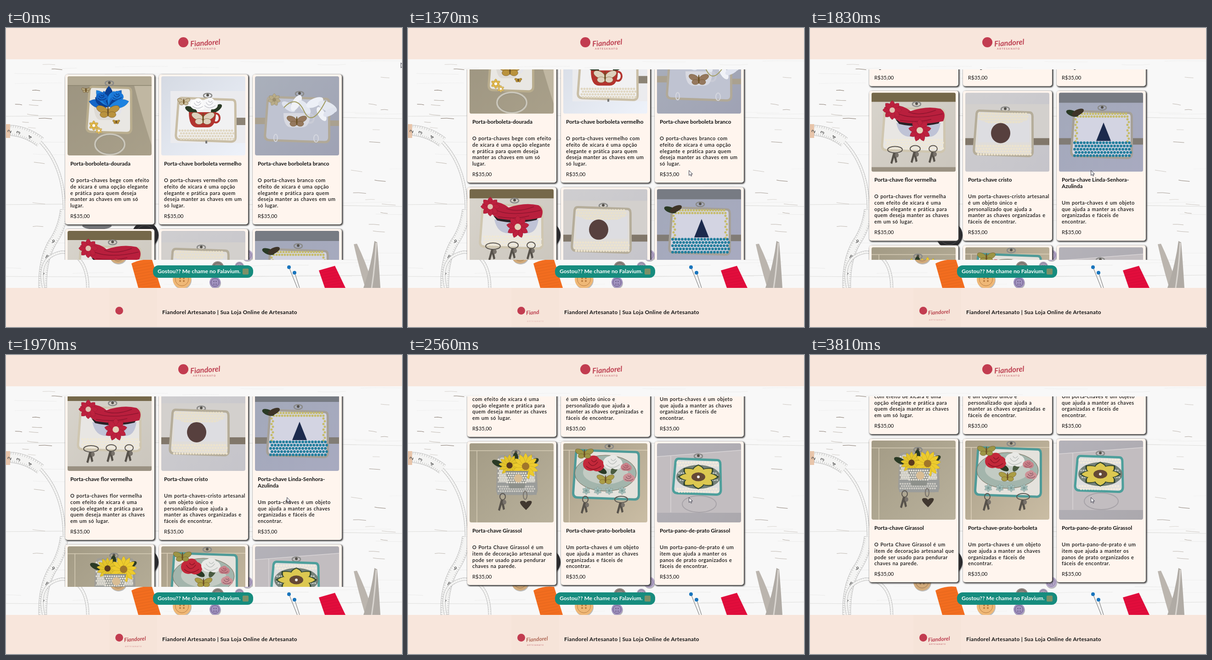
Animation, 862 px wide and 650 px high, one loop 3.88 s. Source, as an HTML page:

```html
<!DOCTYPE html>
<html lang="pt-BR">
<head>
<meta charset="utf-8">
<title>Loja de artesanato</title>
<style>
html, body { margin: 0; width: 100%; height: 100%; overflow: hidden; }
body { position: relative; font: 600 11px/13.85px Lato, Inter, sans-serif; color: #111; background: #f8f8f8; }
#stage { position: absolute; left: 0; top: 0; width: 862px; height: 650px; overflow: hidden; }
#stage > * { position: absolute; white-space: nowrap; }
.bar { left: 0; width: 862px; background: #f8e6dc; }
#view { left: 120px; top: 90px; width: 622px; height: 414px; overflow: hidden; }
#list { position: absolute; left: 0; top: 0; animation: scroll 3.88s linear infinite; }
.card { position: absolute; width: 194px; background: #fff5ee; border-radius: 5px; box-shadow: 1.5px 1.5px 3px 1px #3a3a3a; box-sizing: border-box; padding: 4px 5px; }
.card svg { display: block; width: 183px; height: 172px; border-radius: 4px; }
.card p { margin: 0 6px; }
.card .name { margin-top: 11px; font-weight: 700; font-size: 11.75px; }
.card .text { margin-top: 22px; letter-spacing: .45px; word-spacing: .7px; }
.card .price { margin-top: 9px; font-weight: 400; font-size: 11.3px; }
#chat { left: 320px; top: 516px; width: 218px; height: 27px; border-radius: 12px; background: #168c7e; color: #fff; font-size: 12.2px; font-weight: 700; line-height: 26px; text-indent: 10px; }
#chat i { position: absolute; left: 195px; top: 7px; width: 13px; height: 13px; border-radius: 2px; background: #7d9068; }
.dot { border-radius: 50%; background: #c23c50; }
.brand { color: #bd3f50; font-style: italic; font-weight: 700; transform: rotate(-4deg); }
.sub { color: #c2606a; letter-spacing: .26em; font-weight: 600; }
#wipe { animation: wipe 3.88s linear infinite; }
#rise { animation: rise 3.88s linear infinite; }
#cursor { left: 0; top: 0; animation: move 3.88s linear infinite; }
@keyframes scroll {
  0%, 29.9% { transform: translateY(0); }
  40.21% { transform: translateY(-172px); }
  47.16% { transform: translateY(-300px); }
  53% { transform: translateY(-398px); }
  56%, 58.76% { transform: translateY(-415px); }
  65.98% { transform: translateY(-585px); }
  68.6%, 100% { transform: translateY(-591px); }
}
@keyframes move {
  0% { transform: translate(859px, 75px); }
  14.43% { transform: translate(817px, 132px); }
  28.1%, 29.9% { transform: translate(612px, 305px); }
  33%, 100% { transform: translate(611px, 309px); }
}
@keyframes wipe {
  0%, 15.5% { clip-path: inset(-4px 100% -4px 0); }
  29.9% { clip-path: inset(-4px 56% -4px 0); color: #bd3f50; }
  40.21% { clip-path: inset(-4px 24% -4px 0); }
  46.5%, 100% { clip-path: inset(-4px -4px -4px 0); }
  58.76% { color: #b8494c; }
  66%, 72% { color: #b06a58; }
  90%, 100% { color: #bd3f50; }
}
@keyframes rise {
  0%, 26% { transform: translateY(12px); opacity: 0; }
  29.9% { transform: translateY(11px); opacity: .25; }
  40.21% { transform: translateY(8px); opacity: .42; }
  47.16% { transform: translateY(6px); opacity: .52; }
  58.76% { transform: translateY(4px); opacity: .7; }
  65.98% { transform: translateY(2px); opacity: .85; }
  85%, 100% { transform: translateY(0); opacity: 1; }
}
</style>
</head>
<body>
<div id="stage">
  <svg id="desk" width="862" height="565" style="left:0;top:0"></svg>
  <div id="view"><div id="list"></div></div>
  <div id="chat">Gostou?? Me chame no Falavium.<i></i></div>

  <div class="bar" style="top:0;height:68px"></div>
  <div class="dot" style="left:375px;top:20px;width:22px;height:22px"></div>
  <div class="brand" style="left:401px;top:22px;font-size:16.5px;line-height:20px">Fiandorel</div>
  <div class="sub" style="left:407px;top:41px;font-size:5.6px;line-height:8px">ARTESANATO</div>

  <div class="bar" style="top:565px;height:85px"></div>
  <div style="left:225px;top:565px;width:104px;height:85px;background:#f6e4d9"></div>
  <div class="dot" style="left:238px;top:606px;width:17px;height:17px"></div>
  <div class="brand" id="wipe" style="left:257px;top:610px;font-size:12px;line-height:15px">Fiandorel</div>
  <div class="sub" id="rise" style="left:259px;top:626px;font-size:4.1px;line-height:6px">ARTESANATO</div>
  <div style="left:340px;top:611px;font-size:11.8px;font-weight:700;letter-spacing:.34px">Fiandorel Artesanato | Sua Loja Online de Artesanato</div>

  <svg id="cursor" width="12" height="16"><path d="M.7.7V11.5L3.2 9.3 5 13 6.8 12.2 5.1 8.6H8.4Z" fill="#fff" stroke="#223" stroke-width=".9"/></svg>
</div>
<script>
let seed = 7;
const rnd = (a, b) => a + (b - a) * ((seed = seed * 16807 % 2147483647) / 2147483647);
const range = (n, f) => Array.from({ length: n }, (_, i) => f(i)).join('');

// Drawing helpers
const path = (d, fill, more = '') => `<path d="${d}" fill="${fill}" ${more}/>`;
const line = (d, color, w = 1, more = '') => path(d, 'none', `stroke="${color}" stroke-width="${w}" ${more}`);
const rect = (x, y, w, h, fill, more = '') => `<rect x="${x}" y="${y}" width="${w}" height="${h}" fill="${fill}" ${more}/>`;
const oval = (x, y, rx, ry, fill, more = '') => `<ellipse cx="${x}" cy="${y}" rx="${rx}" ry="${ry}" fill="${fill}" ${more}/>`;
const ring = (x, y, rx, ry, color, w = 2) => oval(x, y, rx, ry, 'none', `stroke="${color}" stroke-width="${w}"`);
const turned = (x, y, deg) => `transform="rotate(${deg} ${x} ${y})"`;
const fade = (id, a, b) => `<linearGradient id="${id}" x2="1" y2="1"><stop stop-color="${a}"/><stop offset="1" stop-color="${b}"/></linearGradient>` + rect(0, 0, 183, 172, `url(#${id})`);
const beads = (x, y, w, rows, color, size = 5) => range(rows, i =>
  line(`M${x + i % 2 * 3} ${y + i * (size + 1)}h${w}`, color, size, `stroke-linecap="round" stroke-dasharray="0 ${size + 1}"`));
const frame = (x, y, w, h, fill, edge, turn = 0) => `<g ${turned(x + w / 2, y + h / 2, turn)}>` +
  path(`M${x + 10} ${y}H${x + w - 10}Q${x + w - 3} ${y} ${x + w - 3} ${y + 10}L${x + w} ${y + h - 10}Q${x + w} ${y + h} ${x + w - 10} ${y + h}H${x + 10}Q${x} ${y + h} ${x} ${y + h - 10}L${x + 3} ${y + 10}Q${x + 3} ${y} ${x + 10} ${y}z`,
    fill, `stroke="${edge}" stroke-width="5"`) + '</g>';
const petal = (x, y, r, w, deg, color) => path(`M${x} ${y}q${-w} ${-r * .6} 0 ${-r}q${w} ${r * .4} 0 ${r}`, color, `${turned(x, y, deg)} stroke="#0003" stroke-width=".6"`);
const fan = (x, y, r, n, spread, colors) => range(n, i => petal(x, y, r * (i % 2 ? .8 : 1), r * .4, (i / (n - 1) - .5) * spread, colors[i % colors.length]));
const flower = (x, y, r, n, color, core) => range(n, i => petal(x, y, r, r * Math.min(.6, 4.5 / n), i * 360 / n, color)) + oval(x, y, r * .28, r * .28, core);
const rose = (x, y, r, color, shade) => oval(x - r * .3, y, r * .7, r * .65, color) + oval(x + r * .35, y + r * .1, r * .65, r * .6, color) + oval(x, y - r * .2, r * .6, r * .6, color) +
  line(`M${x - r * .5} ${y - r * .2}q${r * .4} ${r * .7} ${r * .9} 0M${x - r * .2} ${y - r * .4}q${r * .2} ${r * .4} ${r * .5} 0M${x - r * .7} ${y + r * .2}q${r * .6} ${r * .6} ${r * 1.4} 0`, shade, 1.5);
const butterfly = (x, y, s, color) => [-1, 1].map(k =>
  oval(x + k * s * .5, y - s * .15, s * .45, s * .25, color, `${turned(x + k * s * .5, y, k * -25)} stroke="#6b4f2299"`) +
  oval(x + k * s * .3, y + s * .25, s * .3, s * .22, color, 'stroke="#6b4f2299"')).join('') + oval(x, y, 1.5, s * .4, '#6b4f22');
const cup = (x, y, w, h, color, handle = color) => ring(x + w, y + h * .38, 8, h * .3, handle, 4) +
  path(`M${x} ${y}h${w}q0 ${h}-${w * .3} ${h}h${-w * .4}q${-w * .3} 0-${w * .3} ${-h}`, color);
const hook = (x, y) => ring(x, y, 9, 5, '#8a8a88', 2.5) + oval(x, y - 1, 3, 3, '#55524c');
const key = (x, y, rx = 6) => ring(x, y, rx, 7, '#5c5751', 2) + path(`M${x - 4} ${y + 7}h5l4 20-4 2-3-12-4 14-4-2z`, '#57524b') + oval(x + 4, y + 12, 4, 5, '#77716a');
const leaf = (x, y, turn, color = '#2a3a25', r = 14) => oval(x, y, r, r * .45, color, turned(x, y, turn));

const photos = [
  fade('a', '#9c9480', '#a9a08a') + rect(0, 0, 183, 19, '#b3aa94') + path('M145 20H183V150Q160 80 145 20', '#c0b7a2') + line('M0 20H183', '#8f8873', 1.5) + hook(91, 15) +
  frame(43, 24, 97, 98, '#e9e7e3', '#b9ad8e', 2) + butterfly(40, 30, 11, '#b3a57e') + cup(57, 57, 51, 38, '#dedad4', '#e4e4ea') +
  fan(90, 66, 45, 9, 150, ['#1466c8', '#0a3f94', '#1d82e0']) + rose(75, 45, 13, '#1466c8', '#0a3a88') + rose(108, 43, 14, '#1b78d8', '#0b4390') +
  butterfly(88, 76, 29, '#b9923d') + flower(57, 107, 11, 6, '#deb548', '#fff') + flower(68, 118, 8, 6, '#e1be62', '#fff') +
  butterfly(106, 99, 9, '#c49a35') + ring(92, 148, 32, 22, '#cac6ba', 4) + ring(92, 148, 30, 20, '#8d8979', 1),

  fade('b', '#d5dae3', '#eef2fa') + rect(20, 32, 163, 113, '#ebebee') + rect(160, 90, 23, 16, '#8c8375') + hook(101, 42) +
  frame(33, 49, 130, 91, '#f1f1f2', '#c9bea6', 2) + beads(40, 118, 116, 4, '#e0d7c2') + butterfly(49, 55, 16, '#cbbd9b') +
  leaf(65, 73, 25) + leaf(120, 70, -35) + rose(80, 61, 17, '#fbfbfb', '#c9c9cf') + rose(106, 60, 17, '#f8f8f9', '#c9c9cf') +
  cup(60, 78, 59, 33, '#b3342f') + butterfly(91, 91, 29, '#ded1bd') + line('M98 140v6', '#777', 4),

  fade('c', '#aab0bb', '#9fa2b4') + rect(0, 90, 30, 14, '#aaa18f') + rect(160, 96, 23, 12, '#aaa18f') + hook(97, 38) +
  frame(23, 47, 140, 94, '#bfc3d1', '#b1a998', 2) + flower(42, 51, 14, 7, '#b9ac88', '#9a8d6c') +
  cup(62, 80, 58, 31, '#d8d9e1', '#c9cbd6') +
  leaf(73, 66, 35, '#dfe3ee', 17) + leaf(90, 58, -60, '#f0f2f7', 19) + leaf(108, 67, 50, '#e4e8f0', 18) + leaf(130, 57, -25, '#edf0f7', 20) +
  leaf(158, 66, 25, '#e4e8f0', 22) + leaf(145, 82, 60, '#f0f2f7', 17) + leaf(163, 78, -30, '#dfe3ee', 16) + line('M63 68Q90 39 107 76T154 53', '#a19c61', 2) +
  butterfly(91, 97, 25, '#95785e') + ring(45, 134, 4, 8, '#d5d7df') + ring(133, 135, 5, 8, '#d5d7df'),

  fade('d', '#d8d4cc', '#cbc6bd') + rect(0, 0, 183, 20, '#75684a') + rect(0, 162, 183, 10, '#9a9182') + hook(98, 25) +
  frame(24, 35, 136, 92, '#e8e6e3', '#cfc6b0', 2) + beads(32, 103, 122, 4, '#efe8d6') +
  path('M54 66H150Q146 96 125 96H85Q60 96 54 66', '#bfc3d6') + path('M52 58Q100 74 152 56L146 67Q100 78 60 68z', '#292126') +
  path('M27 32Q60 20 85 40 120 28 150 35 164 44 156 62 110 72 62 64 40 50 27 32', '#b91f3d') +
  line('M50 42Q85 62 155 46M80 42Q105 52 140 38M62 60Q100 66 130 58', '#8f152f', 1.5) +
  flower(45, 38, 21, 8, '#bd213e', '#e0c0b0') + flower(105, 82, 25, 9, '#bd213e', '#e3d2b9') + key(51, 124, 16) + key(95, 122, 11) + key(134, 122, 9),

  fade('e', '#cfced0', '#c5c4ca') + rect(0, 25, 183, 78, '#d3d0cd') + rect(0, 99, 183, 15, '#81776a') + hook(87, 36) +
  frame(20, 41, 128, 95, '#e0ddd9', '#b5ad9a', 2) + beads(30, 46, 108, 4, '#e9e1cb') + beads(25, 116, 120, 4, '#ece3ce') +
  path('M28 58L52 67H116L140 58V108H28z', '#dddde1') + oval(77, 88, 21, 22, '#57403e'),

  fade('f', '#a3a9ba', '#a8aac0') + rect(0, 0, 183, 22, '#777b83') + rect(0, 99, 183, 14, '#817c75') + hook(94, 33) +
  frame(28, 42, 132, 98, '#d3d4e2', '#a5a097', 2) + beads(38, 46, 114, 2, '#c6bc6b') + beads(36, 58, 5, 9, '#c6bc6b') + beads(149, 58, 4, 9, '#c6bc6b') +
  beads(34, 109, 120, 5, '#237e9d', 6) + leaf(29, 45, 20) + leaf(41, 43, -25, '#3e3428') + path('M97 65l16 40h-32z', '#1c2a4d'),

  fade('g', '#a39b85', '#b9b19c') + line('M0 16H183M16 16V172', '#d5cbb5', 1.5) + hook(101, 20) + frame(60, 28, 86, 82, '#c8c7c0', '#9f9d97') +
  beads(63, 35, 80, 12, '#e1ded4', 4) + leaf(62, 44, 25) + leaf(138, 41, -30) + leaf(100, 34, 90) +
  flower(87, 48, 24, 13, '#e3c32b', '#5a3a1e') + flower(122, 50, 29, 13, '#edcb2d', '#a0762a') + rect(60, 85, 86, 27, '#9b9d9b') + beads(63, 94, 80, 3, '#cfcdc6', 4) +
  path('M78 60H128L119 98H87z', '#8e918c') + beads(82, 65, 42, 5, '#e6e2d8', 4) + oval(106, 76, 9, 9, '#d9bd94') +
  key(72, 116) + ring(121, 113, 4, 9, '#77716a') + path('M123 145q-22-20-7-20 5 0 7 4 2-4 8-4 12 0-8 20', '#40372f'),

  fade('h', '#a89e88', '#cabda4') + line('M0 15H183M13 15V172', '#dccfb8', 1.5) + hook(100, 7) +
  frame(23, 17, 143, 103, '#e4e2dc', '#4f9b98', 2) + oval(92, 65, 67, 39, '#a3b5ac', 'stroke="#776b58"') + oval(92, 63, 49, 26, '#c3cbc3') +
  leaf(82, 58, 30) + leaf(112, 55, -60, '#4a5b40') + rose(66, 45, 23, '#c3283a', '#8b1526') + rose(108, 42, 21, '#e9e9e6', '#bfc3c0') +
  rose(137, 52, 12, '#c98189', '#9f5c67') + rose(143, 75, 13, '#cd9297', '#8f606b') + butterfly(92, 78, 22, '#aa9d45') + butterfly(46, 22, 23, '#9c9545') +
  [50, 75, 100, 128].map(x => flower(x, 103, 9, 6, '#a3beb9', '#7a9c98')).join('') + key(48, 122) + key(126, 122, 14),

  fade('i', '#b4b2b9', '#aba8ad') + path('M0 29L183 15V151H0z', '#c2bdc0') + line('M0 29L183 15M30 27V150', '#d8d4d6', 1.5) + hook(90, 28) +
  frame(36, 35, 104, 75, '#dedede', '#4d9f9b', 2) + beads(45, 42, 86, 2, '#f1eadb') + beads(45, 99, 86, 2, '#f1eadb') +
  oval(90, 73, 48, 26, '#74817a') + beads(48, 65, 84, 4, '#c5c8c0', 4) +
  `<g transform="translate(90 73) scale(1 .6)">${flower(0, 0, 45, 8, '#2f4630', '#304c31') + flower(0, 0, 41, 8, '#dcc851', '#654936') + oval(0, 0, 26, 28, '#dcc851') + oval(0, 0, 15, 16, '#654936') + oval(0, 0, 3, 5, '#eee')}</g>` +
  ring(92, 132, 37, 18, '#a7a3a8', 2)
];

const goods = [
  ['Porta-borboleta-dourada', 'O porta-chaves bege com efeito|de xícara é uma opção elegante|e prática para quem deseja|manter as chaves em um só|lugar.'],
  ['Porta-chave borboleta vermelho', 'O porta-chaves vermelho com|efeito de xícara é uma opção|elegante e prática para quem|deseja manter as chaves em um|só lugar.'],
  ['Porta-chave borboleta branco', 'O porta-chaves branco com|efeito de xícara é uma opção|elegante e prática para quem|deseja manter as chaves em um|só lugar.'],
  ['Porta-chave flor vermelha', 'O porta-chaves flor vermelha|com efeito de xícara é uma|opção elegante e prática para|quem deseja manter as chaves|em um só lugar.'],
  ['Porta-chave cristo', 'Um porta-chaves-cristo artesanal|é um objeto único e|personalizado que ajuda a|manter as chaves organizadas e|fáceis de encontrar.'],
  ['Porta-chave Linda-Senhora-|Azulinda', 'Um porta-chaves é um objeto|que ajuda a manter as chaves|organizadas e fáceis de|encontrar.'],
  ['Porta-chave Girassol', 'O Porta Chave Girassol é um|item de decoração artesanal que|pode ser usado para pendurar|chaves na parede.'],
  ['Porta-chave-prato-borboleta', 'Um porta-chaves é um objeto|que ajuda a manter as chaves|organizadas e fáceis de|encontrar.'],
  ['Porta-pano-de-prato Girassol', 'Um porta-pano-de-prato é um|item que ajuda a manter os|panos de prato organizados e|fáceis de encontrar.']
];
const lines = s => s.split('|').join('<br>');
list.innerHTML = goods.map(([name, text], i) => {
  const row = Math.floor(i / 3);
  return `<div class="card" style="left:${9 + i % 3 * 204}px;top:${11 + row * 336}px;height:${row < 2 ? 326 : 312}px">
    <svg viewBox="0 0 183 172">${photos[i]}</svg>
    <p class="name">${lines(name)}</p><p class="text">${lines(text)}</p><p class="price">R$35,00</p></div>`;
}).join('');

// Wooden desk with sewing things
const button = (x, y, r, color, hole) => oval(x + 1, y + 2, r, r, '#bbb') + oval(x, y, r, r, color) + ring(x, y, r * .72, r * .72, hole, 1) +
  [-1, 1].map(k => oval(x + k * r * .2, y - 2, r * .1, r * .1, hole) + oval(x + k * r * .2, y + 4, r * .1, r * .1, hole)).join('');
const spool = (d, color, x, y) => path(d, color) + range(9, i => line(`M${x + i * 1.7} ${y + i * 6}l42-8`, '#0001', 1));
const tape = (d, w) => line(d, '#b4b4b4', w + 1.5) + line(d, '#f4f4f3', w) + line(d, '#777', w, 'stroke-dasharray=".8 4" opacity=".5"') + line(d, '#f4f4f3', w * .6);
const digit = (x, y, n, turn) => `<text transform="translate(${x} ${y}) rotate(${turn})" font-size="11" fill="#444">${n}</text>`;

desk.innerHTML = rect(0, 68, 862, 497, '#f8f8f8') +
  range(60, () => { const y = rnd(72, 560); return line(`M${rnd(-20, 840)} ${y}q${rnd(20, 60)} ${rnd(-3, 3)} ${rnd(50, 140)} ${rnd(-3, 3)}`, '#ececeb', rnd(.5, 1.2)); }) +
  [[192, 5], [384, 4], [540, -3]].map(([y, k]) => line(`M0 ${y}Q400 ${y - k} 862 ${y + k}`, '#dededc', 1.2)).join('') +
  range(26, i => { const x = i % 2 ? rnd(740, 830) : rnd(0, 100); return line(`M${x} ${rnd(75, 450)}l${rnd(6, 14)} ${rnd(-1, 2)} ${rnd(5, 18)} ${rnd(0, 2)}`, i % 3 ? '#b8b0a8' : '#84776c', rnd(.5, 1.1)); }) +
  tape('M72 245Q128 300 127 400', 5) + tape('M0 222Q42 222 75 248', 22) + rect(0, 209, 9, 30, '#e8c5aa') +
  digit(10, 229, 2, -70) + digit(29, 232, 3, -65) + digit(53, 242, 4, -50) +
  tape('M127 395Q122 436 101 466 78 505 80 565', 17) + digit(98, 466, 9, 30) + digit(85, 500, 8, 20) + digit(77, 540, 7, 5) +
  tape('M82 565Q66 497 122 487 177 490 178 565', 5) +
  oval(198, 430, 32, 8, '#77787c') + button(303, 450, 29, '#29292c', '#55565a') + button(244, 493, 19, '#d2ab7b', '#97734d') +
  button(461, 520, 13, '#8e8580', '#5e5753') + button(508, 518, 10, '#aaa0b9', '#756c89') + button(525, 494, 12, '#b8abcd', '#81739a') +
  button(383, 546, 20, '#efb877', '#b97c3f') + button(455, 553, 12, '#a192bf', '#65577f') +
  spool('M273 512Q295 501 318 504L337 565H288z', '#f26d1f', 275, 518) + spool('M681 527L716 517 739 565H694z', '#e20d3c', 682, 532) +
  line('M616 520L634 565M628 531L639 565', '#888', 1.2) + oval(616, 520, 4, 4, '#1975bd') + oval(628, 532, 4, 4, '#1975bd') +
  path('M757 470l7-1Q786 515 801 565H782Q767 515 757 470', '#bbb5ae') + path('M802 463l6 3Q812 515 815 565H778Q796 512 802 463', '#b0aba5') +
  line('M806 467Q803 520 796 565', '#d9d5d0', 3);
</script>
</body>
</html>
```
